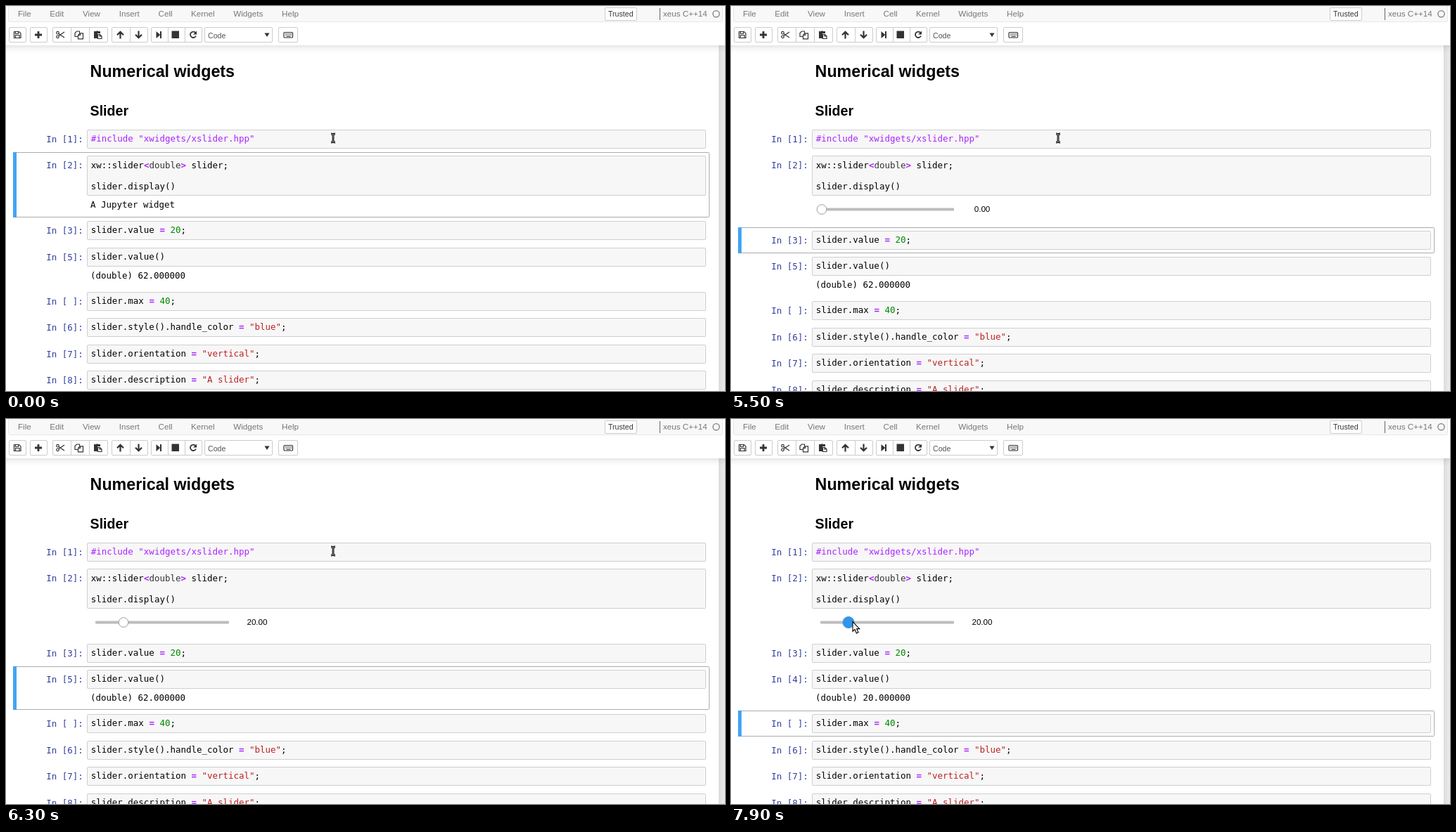
An HTML page that plays this animation: 1022x548 px, repeating every 8000 ms.

```html
<!DOCTYPE html>
<html lang="en">
<head>
<meta charset="utf-8">
<title>Notebook slider</title>
<style>
  html, body { margin: 0; width: 100%; height: 100%; overflow: hidden; background: #fff; }
  svg { display: block; width: 100vw; height: 100vh; }
  text { white-space: pre; font: 11.65px "Liberation Sans", Arial, sans-serif; }
  .mono { font: 12.48px "DejaVu Sans Mono", monospace; }
  .menu { fill: #777; }
  .small { font-size: 10.6px; }
  .prompt { fill: #303f9f; }
  .op { fill: #a2f; font-weight: bold; }
  .meta { fill: #a2f; }
  .str { fill: #ba2121; }
  .num { fill: #080; }
  .type { fill: #333; }
  .button { fill: #fff; stroke: #ccc; }
  .line { fill: none; stroke: #333; stroke-width: 1.2; }
  .solid { fill: #333; }
</style>
</head>
<body>
<svg viewBox="0 0 1022 548">
  <defs>
    <linearGradient id="edge">
      <stop offset="0" stop-color="#dcdcdc"/><stop offset="1" stop-color="#ececec"/>
    </linearGradient>
    <linearGradient id="shade" x2="0" y2="1">
      <stop offset="0" stop-color="#575757" stop-opacity=".15"/>
      <stop offset=".45" stop-color="#575757" stop-opacity=".05"/>
      <stop offset="1" stop-color="#575757" stop-opacity="0"/>
    </linearGradient>
  </defs>
  <rect width="1022" height="548" fill="#fff"/>
  <rect x="1013" width="9" height="548" fill="url(#edge)"/>
  <text x="119.6" y="101" style="font-size:23.25px;font-weight:bold">Numerical widgets</text>
  <text x="119.6" y="156" style="font-size:19.6px;font-weight:bold">Slider</text>
  <g id="cells"></g>

  <rect y="56" width="1022" height="11" fill="url(#shade)"/>
  <rect width="1022" height="56" fill="#fff"/>
  <path d="M3.5 -1V20.5q0 2 2 2H1016.5q2 0 2-2V-1" fill="#f8f8f8" stroke="#e7e7e7"/>
  <g id="menu"></g>
  <rect class="button" x="851.5" y="2.5" width="45" height="18" rx="1.5"/>
  <text class="small" x="856" y="15" fill="#333">Trusted</text>
  <path d="M929.5 3V20" stroke="#666"/>
  <text class="menu" x="934" y="15">xeus C++14</text>
  <circle id="kernel" cx="1009.5" cy="11.3" r="4.6" stroke="#777" stroke-width="1.3"/>

  <g id="buttons"></g>
  <text class="small" x="287" y="46" fill="#555">Code</text>
  <path class="solid" d="M367.5 38.5h7l-3.5 5.5z"/>
  <!-- save -->
  <path class="line" d="M11.5 36.5h7l2.5 2.5v6.5h-9.5zM13.5 45v-3.5h5.5v3.5M13.5 37v2.5h4v-2.5"/>
  <!-- add -->
  <path d="M46 36v10M41 41h10" stroke="#333" stroke-width="2.8"/>
  <!-- cut, copy, paste -->
  <path class="line" d="M74.5 39.3L83 45M74.5 42.7L83 37"/>
  <circle class="line" cx="73.5" cy="38.2" r="1.8"/>
  <circle class="line" cx="73.5" cy="43.8" r="1.8"/>
  <path class="line" d="M102 43.5h-4v-5l2.5-2.5h4v2.5M102.5 41.3l2.5-2.5h4.5v8h-7zM102.5 41.5h3v-2.5"/>
  <path class="solid" d="M125 36h3q1.5-1.5 3 0h3v3h-4v7h-5z"/>
  <path class="line" d="M130.5 40.5h3l2.5 2.5v3.5h-5.5zM133 40.5v2.5h3"/>
  <!-- move -->
  <path d="M162.5 46.5v-9M158 41.3l4.5-4.5 4.5 4.5M188.5 35.5v9M184 40.7l4.5 4.5 4.5-4.5" fill="none" stroke="#333" stroke-width="2.2"/>
  <!-- run, stop, restart -->
  <path class="solid" d="M213.5 36l5.5 4.7v-4.7h2v10h-2v-4.7l-5.5 4.7zM235.5 35.5h10.5v10.5h-10.5z"/>
  <path d="M269.5 38.2A4.2 4.2 0 1 0 270 42.5" fill="none" stroke="#333" stroke-width="1.8"/>
  <path class="solid" d="M271 35.5v5h-5z"/>
  <!-- keyboard -->
  <rect class="line" x="395" y="37.5" width="12.5" height="7.5" rx="1"/>
  <path d="M397 39.5h9M397 41.3h9" stroke="#333" stroke-dasharray="1.2 .8"/>
  <path d="M398.5 43.3h6" stroke="#333"/>
  <g id="pointer"></g>
</svg>
<script>
const LOOP = 8000;
const $ = id => document.getElementById(id);
const esc = s => s.replace(/</g, "&lt;").replace(/>/g, "&gt;");
const span = (cls, s) => `<tspan class="${cls}">${esc(s)}</tspan>`;
const mono = (x, y, body, cls = "") =>
  `<text class="mono ${cls}" x="${x}" y="${Math.round(y)}">${body}</text>`;

function highlight(code) {
  if (code[0] === "#") return span("meta", code);
  return code.split(/("[^"]*"|\b\d+\b|double|[<>=])/).map((part, i) => {
    if (i % 2 === 0) return esc(part);
    const cls = part[0] === '"' ? "str" : /\d/.test(part) ? "num" : part === "double" ? "type" : "op";
    return span(cls, part);
  }).join("");
}

// Boxes snap down to whole pixels, text baselines to the nearest one
function cell(y, mark, lines, selected, outHeight = 0, out = "") {
  const top = Math.floor(y), height = lines.length > 1 ? 56 : 26;
  const full = Math.round(height + outHeight + 10.4);
  const frame = selected
    ? `<rect x="10.5" y="${top - 4.5}" width="989" height="${full}" rx="1" fill="#fff" stroke="#ababab"/>
       <rect x="10" y="${top - 5}" width="5" height="${full + 1}" fill="#42a5f5"/>`
    : "";
  return frame + mono(57.3, y + 17.5, `In [${mark}]:`, "prompt") +
    `<rect x="115.5" y="${top + .5}" width="879" height="${height}" rx="1.5" fill="#f7f7f7" stroke="#cfcfcf"/>` +
    lines.map((line, i) => mono(120.8, y + 16.6 + i * 15.2, highlight(line))).join("") +
    (out && mono(120, y + height + 17.4, out));
}

function slider(value, handle) {
  const look = handle === "idle" ? 'r="6.8" fill="#fff" stroke="#9e9e9e"'
    : `r="${handle === "active" ? 8 : 6.8}" fill="#3394e8" stroke="#3394e8"`;
  return `<rect x="127" y="287.5" width="190" height="4" rx="1" fill="#bdbdbd"/>
    <circle cx="${129 + value * 1.9}" cy="289.5" ${look}/>
    <text x="357" y="293" text-anchor="middle">${value.toFixed(2)}</text>`;
}

function notebook(t) {
  const shown = t >= 5500, done = t >= 6700;
  const selected = t < 100 ? 2 : t < 6100 ? 3 : !done ? 4 : 5;
  const out = t < 100 ? 25.4 : shown ? 38.7 : 0;
  const handle = t >= 7900 ? "active" : t >= 7600 ? "hover" : "idle";
  let y = 281.4 + out;
  let html = cell(176.4, 1, ['#include "xwidgets/xslider.hpp"']) +
    cell(213.95, t >= 100 && !shown ? "*" : 2, ["xw::slider<double> slider;", "", "slider.display()"],
      selected === 2, out, t < 100 ? "A Jupyter widget" : "");
  if (shown) html += slider(t < 6300 ? 0 : 20, handle);
  html += cell(y, t >= 6100 && t < 6300 ? "*" : 3, ["slider.value = 20;"], selected === 3);
  html += cell(y += 37.5, done ? 4 : 5, ["slider.value()"], selected === 4, 25,
    `(double) ${done ? 20 : 62}.000000`);
  y += 63 - 37.5;
  [[" ", "slider.max = 40;"],
   [6, 'slider.style().handle_color = "blue";'],
   [7, 'slider.orientation = "vertical";'],
   [8, 'slider.description = "A slider";']].forEach(([mark, code], i) => {
    html += cell(y += 37.5, mark, [code], selected === 5 && i === 0);
  });
  return html;
}

function pointer(t) {
  const step = Math.max(0, Math.min(6, Math.floor((t - 7000) / 100))) / 6;
  const p = step * step * (3 - 2 * step);
  const x = 465 - 292 * p, y = 188 + 100.7 * p;
  const overCode = y < 271;
  const beam = "M-3-6Q0-6 0-5Q0-6 3-6M0-5V5M-3 6Q0 6 0 5Q0 6 3 6";
  const shape = overCode
    ? `<path d="${beam}" fill="none" stroke="#000" stroke-width="2.8"/><path d="${beam}" fill="none" stroke="#aaa" stroke-width=".9"/>`
    : '<path d="M0 0V13.5L3 10.8L5.4 16.2L8 15L5.7 9.9H9.7Z" fill="#fff" stroke="#000" stroke-width="1.1"/>';
  return `<g transform="translate(${x} ${y})">${shape}</g>`;
}

const cache = {};
function update(id, html) {
  if (cache[id] !== html) $(id).innerHTML = cache[id] = html;
}

function draw(now) {
  const t = now % LOOP;
  const busy = t >= 200 && t < 5500 || t >= 6100 && t < 6300;
  $("kernel").setAttribute("fill", busy ? "#777" : "none");
  update("cells", notebook(t));
  update("pointer", pointer(t));
}

const menu = { File: 17, Edit: 62.3, View: 109, Insert: 160.7, Cell: 216.5, Kernel: 263, Widgets: 323.3, Help: 392 };
$("menu").innerHTML = Object.entries(menu)
  .map(([name, x]) => `<text class="menu" x="${x}" y="15">${name}</text>`).join("");

// Toolbar groups: left edge, button width, count
$("buttons").innerHTML = [[4, 24, 1], [34, 24, 1], [66, 26, 3], [150, 25.5, 2], [206, 24, 3], [282, 96, 1], [387, 27, 1]]
  .map(([x, w, n]) => {
    let html = `<rect class="button" x="${x + .5}" y="30.5" width="${w * n}" height="21" rx="1.5"/>`;
    for (let i = 1; i < n; i++) html += `<path d="M${Math.round(x + w * i) + .5} 31v20" stroke="#ccc"/>`;
    return html;
  }).join("");

const start = performance.now();
function tick() {
  draw(performance.now() - start);
  requestAnimationFrame(tick);
}
tick();
</script>
</body>
</html>
```
